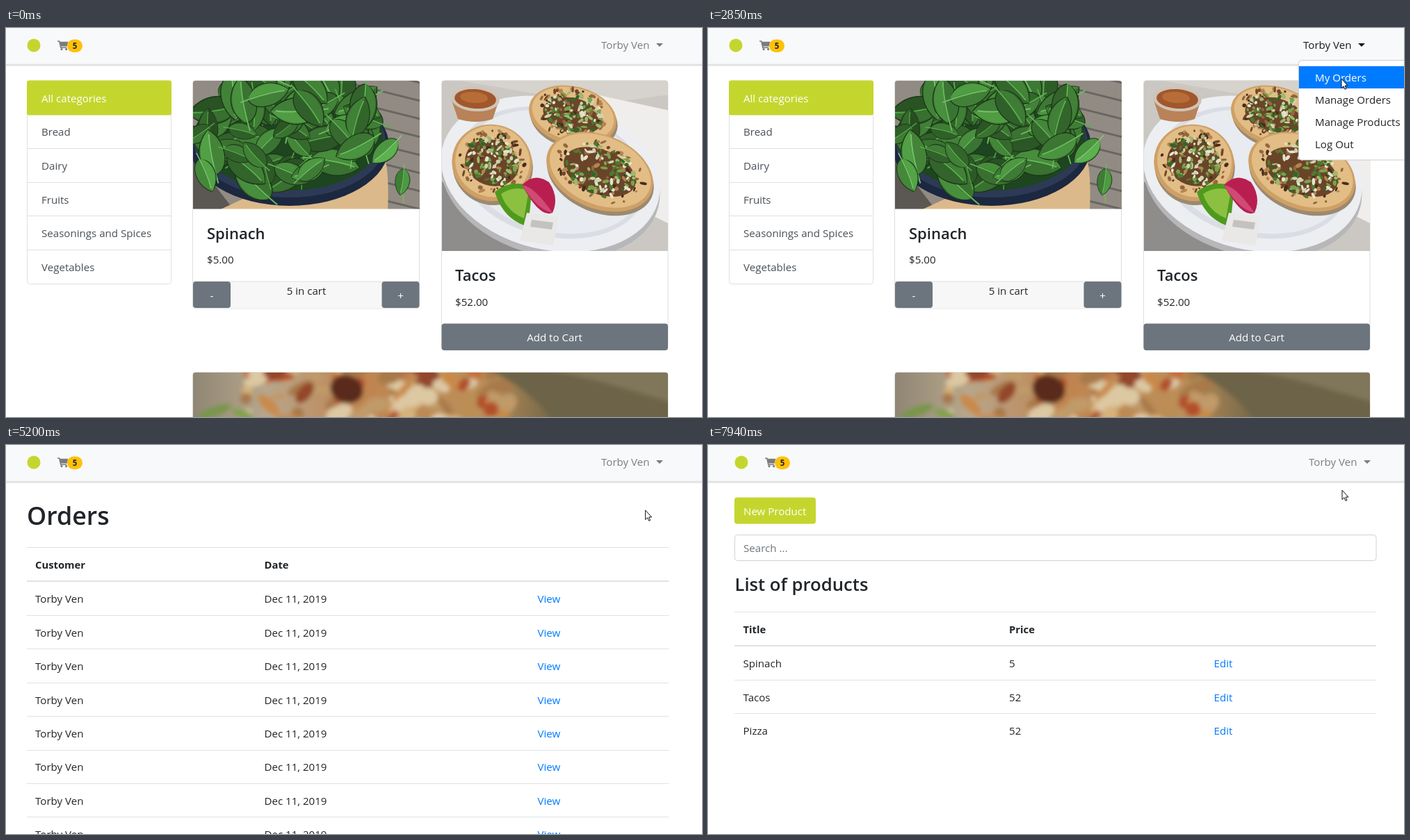
Write an HTML page that moves like this. It is 1001x560 px and loops after 8 s.

```html
<!DOCTYPE html>
<html lang="en">
<head>
<meta charset="utf-8">
<title>Shop</title>
<style>
html, body { margin: 0; width: 100%; height: 100%; overflow: hidden; background: #fff; }
svg { display: block; width: 100vw; height: 100vh; font: 15.1px "Open Sans", "Noto Sans", sans-serif; fill: #212529; }
.b { font-weight: 700; font-size: 14.8px; }
.h { font-weight: 600; }
</style>
</head>
<body>
<svg id="stage" viewBox="0 0 1001 560" preserveAspectRatio="none"></svg>
<script>
const LOOP = 8000;
const USER = 'Torby Ven';
const LIME = '#c4d62e', GREY = '#6c757d', BLUE = '#007bff';

// Markup helpers; text is placed by the middle of its capitals.
const text = (x, mid, s, attrs = '') => `<text x="${x}" y="${mid + 5.5}" ${attrs}>${s}</text>`;
const heading = (x, base, s, size) => `<text x="${x}" y="${base}" class="h" font-size="${size}">${s}</text>`;
const rect = (x, y, w, h, fill, attrs = '') => `<rect x="${x}" y="${y}" width="${w}" height="${h}" fill="${fill}" ${attrs}/>`;
const oval = (x, y, rx, ry, fill, turn = 0) =>
  `<ellipse cx="${x}" cy="${y}" rx="${rx}" ry="${ry}" fill="${fill}" transform="rotate(${turn} ${x} ${y})"/>`;
const path = (d, fill, attrs = '') => `<path d="${d}" fill="${fill}" ${attrs}/>`;
const rule = (x, y, w, h = 1) => rect(x, y, w, h, '#dee2e6');
const white = 'fill="#fff"', centred = 'text-anchor="middle"';
const repeat = (n, f) => Array.from({ length: n }, (_, i) => f(i)).join('');

let seed = 7;
const rnd = (a = 0, b = 1) => {
  seed = (seed * 16807) % 2147483647;
  return +(a + (b - a) * seed / 2147483647).toFixed(2);
};
const pick = list => list[Math.floor(rnd(0, list.length))];

function photo(id, x, y, w, h, body, blur = 0.7) {
  return `<clipPath id="${id}"><path d="M${x} ${y + h}V${y + 3}q0-3 3-3H${x + w - 3}q3 0 3 3V${y + h}Z"/></clipPath>
    <filter id="${id}Soft"><feGaussianBlur stdDeviation="${blur}"/></filter>
    <g clip-path="url(#${id})"><g filter="url(#${id}Soft)">${body}</g></g>`;
}

function leaf(x, y, size, turn, light) {
  const green = l => `hsl(112 40% ${l}%)`;
  return `<g transform="translate(${x} ${y}) rotate(${turn}) scale(${size})">
    <path d="M-1 .1C-.8-.7.4-.8 1 0C.4.75-.8.7-1 .1Z" fill="${green(light)}" stroke="${green(15)}" stroke-width=".04"/>
    <path d="M-1 0C-.7-.6.4-.7 1 0Q0-.15-1 0Z" fill="${green(light + 8)}"/>
    <path d="M-1.4.1Q0-.1.8 0" fill="none" stroke="${green(light + 22)}" stroke-width=".06"/></g>`;
}

function spinach() {
  const planks = repeat(9, i => path(`M400 ${30 + i * 26}L600 ${80 + i * 26}`, 'none', 'stroke="#696560" stroke-width="3"'));
  const leaves = repeat(85, i => {
    const a = rnd(0, 6.28), r = Math.sqrt(rnd());
    return leaf(402 + Math.cos(a) * r * 128, 144 + Math.sin(a) * r * 82, rnd(20, 36), rnd(0, 360), rnd(17, 30) + i / 9);
  });
  return rect(265, 70, 335, 195, '#918b84') + planks +
    path('M265 180L330 265H265Z', '#5b5752') +
    path('M300 265L440 200L540 180Q552 190 549 265Z', '#dcb98a') +
    oval(408, 170, 143, 86, '#1c2740') + oval(408, 164, 138, 80, '#2d3a55') + oval(408, 156, 134, 78, '#1d4520') +
    leaves + leaf(570, 222, 19, 100, 35) + path('M571 240L572 252', 'none', 'stroke="#7fae5e" stroke-width="2"') +
    leaf(545, 178, 24, 140, 42) + leaf(288, 212, 25, 70, 38);
}

function taco(x, y, rx, ry, turn) {
  const scatter = (n, spread, colours) => repeat(n, () => {
    const a = rnd(0, 6.28), r = Math.sqrt(rnd()) * spread;
    return oval(x + Math.cos(a) * r * rx, y - 3 + Math.sin(a) * r * ry, rnd(1.5, 5.5), rnd(1.2, 3), pick(colours), rnd(0, 180));
  });
  return `<g transform="rotate(${turn} ${x} ${y})">` +
    oval(x + 3, y + 5, rx, ry, '#9c8a70') + oval(x, y, rx, ry, '#cfa066') + oval(x, y - 2, rx - 4, ry - 4, '#e2bd85') +
    oval(x, y, rx * 0.68, ry * 0.6, '#6a4429') +
    scatter(80, 0.84, ['#4a2c1b', '#70452a', '#94663f', '#b58450']) +
    scatter(110, 0.68, ['#4d7a31', '#7ba24a', '#e6e2cd', '#cfd2ad', '#3c6127', '#9fb86c']) + '</g>';
}

function tacos() {
  return rect(620, 70, 340, 260, '#cbc8c4') +
    path('M620 70H960V95L850 110Z', '#d6d2cc') + path('M620 215L760 330H620Z', '#8f8d8c') +
    path('M845 95L960 120V285L900 255Z', '#efeeec') +
    oval(783, 219, 160, 109, '#b7b7b9', 14) + oval(783, 210, 160, 109, '#eceef1', 14) +
    oval(785, 208, 138, 92, '#dadde3', 14) + oval(787, 207, 131, 86, '#e8ebef', 14) +
    path('M641 104L650 131Q676 139 700 131L709 104Z', '#b98258') +
    oval(675, 102, 35, 18, '#d0c3b6', 4) + oval(675, 102, 30, 14, '#a0572c', 4) + oval(673, 100, 20, 8, '#b86c38', 4) +
    taco(815, 126, 64, 42, 14) + taco(699, 194, 58, 55, 20) + taco(854, 207, 80, 53, 22) +
    path('M703 236Q725 217 757 228L751 286Q715 276 703 236Z', '#4f9a1e') +
    path('M712 239Q730 226 752 234L745 274Q720 264 712 239Z', '#8cc040') +
    path('M742 226Q760 207 781 222Q796 244 786 266Q768 274 742 226Z', '#b81f50') +
    path('M742 226Q760 228 786 266Q764 262 742 226Z', '#d04a74') +
    path('M749 266L795 272L787 313L739 306Z', '#e9e8e6') + path('M756 276L787 280L785 290L754 286Z', '#c4c2bf');
}

function pizza() {
  const blobs = repeat(75, () =>
    oval(rnd(340, 730), rnd(490, 570), rnd(7, 24), rnd(5, 13),
      pick(['#b2502c', '#c98a4a', '#d6b27a', '#c09a68', '#94472a', '#dcc8a2', '#c4703a', '#a8794a']), rnd(-50, 50)));
  return `<linearGradient id="crust"><stop offset="0" stop-color="#8d8472"/><stop offset=".16" stop-color="#b7a78c"/>
    <stop offset=".35" stop-color="#c08450"/><stop offset=".6" stop-color="#bb8f58"/><stop offset=".74" stop-color="#7a6a4a"/>
    <stop offset="1" stop-color="#736a50"/></linearGradient>` +
    rect(262, 490, 700, 80, 'url(#crust)') + blobs +
    path('M690 490Q755 520 790 570H960V490Z', '#6d6449') + path('M770 490Q850 505 960 540V490Z', '#80765a') +
    oval(490, 520, 24, 20, '#5a2a1b', 20) + oval(300, 552, 26, 7, '#789648', -20) + oval(340, 556, 16, 7, '#84a050', 20);
}

const frame = (x, y, w, h) => rect(x, y, w, h, '#fff', 'rx="4" stroke="#dfdfdf"');
const button = (x, y, w, h, fill, attrs = '') => rect(x, y, w, h, fill, `rx="4" ${attrs}`);

const categories = ['All categories', 'Bread', 'Dairy', 'Fruits', 'Seasonings and Spices', 'Vegetables'];
const shopPage = frame(30.5, 76, 207, 292.5) + rect(30, 75.5, 208, 50, LIME, 'rx="3"') +
  repeat(6, i => (i > 1 ? rect(31, Math.round(76.3 + i * 48.5), 207, 1, '#dfdfdf') : '') +
    text(51, 101.3 + i * 48.6, categories[i], i ? 'fill="#495057"' : white)) +
  frame(268.5, 75.5, 326, 328.5) + photo('greens', 269, 76, 326, 184.5, spinach()) +
  heading(289, 304, 'Spinach', 22) + text(289, 333.5, '$5.00') +
  rect(269, 364.5, 325.5, 39, '#f7f7f7') + rect(269, 364.5, 325.5, 1, '#dfdfdf') +
  button(269, 365, 54, 38, GREY) + button(540.5, 365, 54, 38, GREY) +
  text(296, 385.5, '-', white + ' ' + centred) + text(567.5, 385.5, '+', white + ' ' + centred) +
  text(432, 378.3, '5 in cart', centred) +
  frame(626.5, 75.5, 325.5, 388) + photo('plate', 627, 76, 325, 245, tacos()) +
  heading(646, 364, 'Tacos', 22) + text(646, 394, '$52.00') +
  button(626.5, 425.5, 325.5, 38.5, GREY, 'id="add"') + text(789, 445.7, 'Add to Cart', white + ' ' + centred) +
  frame(268.5, 495.5, 683.5, 90) + photo('pie', 269, 496, 683, 80, pizza(), 3);

const link = `fill="${BLUE}"`;
const ordersPage = heading(30, 115, 'Orders', 35.8) +
  rule(30, 147, 923) + rule(30, 195, 923, 2) +
  text(42, 172.5, 'Customer', 'class="b"') + text(371.5, 172.5, 'Date', 'class="b"') +
  '<g id="orderRows">' + repeat(8, i => {
    const y = 221.7 + i * 48.45;
    return text(42, y, USER) + text(371.5, y, 'Dec 11, 2019') + text(764.5, y, 'View', link) + rule(30, Math.round(y + 23), 923);
  }) + '</g>';

const products = [['Spinach', 5], ['Tacos', 52], ['Pizza', 52]];
const listPage = button(38, 75.5, 117, 38, LIME) + text(51, 95.5, 'New Product', white) +
  rect(38.5, 129.5, 922.5, 37, '#fff', 'rx="4" stroke="#ced4da"') + text(51, 148.5, 'Search ...', `fill="${GREY}"`) +
  heading(38.5, 210, 'List of products', 25.7) +
  rule(38, 240, 923) + rule(38, 288, 923, 2) +
  text(50.5, 265.5, 'Title', 'class="b"') + text(433, 265.5, 'Price', 'class="b"') +
  '<g id="productRows">' + products.map(([name, price], i) => {
    const y = 314.5 + i * 48.5;
    return text(50.5, y, name) + text(433, y, price) + text(727.5, y, 'Edit', link) + (i < 2 ? rule(38, Math.round(y + 23), 923) : '');
  }).join('') + '</g>';

const nav = rect(0, 0, 1001, 52, '#f8f9fa') + rect(0, 51.7, 1001, 3, '#e2e3e4') +
  `<g id="navItems"><circle cx="40" cy="25" r="9.5" fill="${LIME}"/>
  <path d="M74 19h2.8l2 9.3h8.4" fill="none" stroke="#7c7c7d" stroke-width="1.6"/>
  <path d="M77.3 19.8H89.3L87.7 26.4H78.7Z" fill="#7c7c7d"/>
  <circle cx="80" cy="30.6" r="1.6" fill="#7c7c7d"/><circle cx="86.6" cy="30.6" r="1.6" fill="#7c7c7d"/>` +
  rect(88, 16.5, 22, 18.5, '#ffc107', 'rx="9.2"') +
  text(99, 24.7, '5', 'class="b" style="font-size:11.5px" ' + centred) +
  `<g id="user">${text(856, 24.8, USER)}<path d="M935 22h10l-5 5Z"/></g></g>`;

const menuItems = ['My Orders', 'Manage Orders', 'Manage Products', 'Log Out'];
const ITEM_TOP = 55, ITEM_H = 32;
const menu = '<g id="menu">' + rect(849.5, 46.5, 160, 143.5, '#fff', 'rx="4" stroke="#ccc"') +
  menuItems.map((s, i) => `<g class="item">${rect(850, ITEM_TOP + i * ITEM_H, 151, ITEM_H, '#fff')}${text(873, 71.7 + i * 31.9, s)}</g>`).join('') + '</g>';

const outline = 'stroke="#111" stroke-width="1" stroke-linejoin="round"';
const pointer = '<g id="pointer">' +
  path('M0 0V13.5L3 10.7L5 15.3L7 14.4L5 10H9Z', '#fff', outline + ' id="arrow"') +
  path('M-1.5 1.5Q-1.5 0 0 0T1.5 1.5V6Q4 5 4.7 6.8Q7 6 7.4 8Q9.5 7.5 9.5 9.5V13Q9.5 16 7.8 18.5H0Q-2 15-4.6 11.8Q-5.5 10-3.5 9.8L-1.5 11.5Z', '#fff', outline + ' id="hand"') +
  path('M-3-7H-.5L0-6.5L.5-7H3M0-6.5V6.5M-3 7H-.5L0 6.5L.5 7H3', 'none', 'stroke="#111" id="beam"') +
  '<circle id="click" r="12" fill="#ff0" opacity=".5"/></g>';

document.getElementById('stage').innerHTML = rect(0, 0, 1001, 560, '#fff') +
  `<g id="shop">${shopPage}</g><g id="orders">${ordersPage}</g><g id="list">${listPage}</g>` + nav + menu + pointer;

const $ = id => document.getElementById(id);
const show = (id, on) => { $(id).style.display = on ? '' : 'none'; };
const items = [...document.querySelectorAll('.item')];

// Pointer moves: first step, last step, number of steps, end point.
const START = [786, 500];
const moves = [
  [130, 910, 11, 882, 15],
  [1610, 1930, 5, 915, 101], [2010, 2250, 4, 911, 73],
  [3390, 3630, 4, 917, 32],
  [4100, 4500, 6, 920, 101],
  [5120, 5580, 7, 916, 25],
  [6310, 6680, 6, 926, 148],
  [7320, 7390, 2, 926, 147], [7620, 7620, 1, 926, 146], [7790, 7940, 3, 912, 65]
];
const clicks = [[1060, 1230], [2470, 2620], [3880, 3950], [4660, 4810], [5980, 6130], [7000, 7080]];
const menuOpen = [[1230, 2930], [3950, 4810], [6130, 7080]];
const presses = [[2470, 2930], [4660, 4810], [7000, 7080]];

const within = (t, [a, b]) => t >= a && t < b;
const ease = u => u < 0.5 ? 4 * u ** 3 : 1 - 4 * (1 - u) ** 3;

function pointerAt(t) {
  let [x, y] = START;
  for (const [from, to, steps, toX, toY] of moves) {
    if (t < from) break;
    const stepTime = (to - from) / (steps - 1 || 1) || 1;
    const u = ease(Math.min(steps, Math.floor((t - from) / stepTime + 1e-6) + 1) / steps);
    x += (toX - x) * u;
    y += (toY - y) * u;
  }
  return [x, y];
}

function draw(t) {
  const [x, y] = pointerAt(t);
  const page = t < 2930 ? 'shop' : t < 7080 ? 'orders' : 'list';
  for (const p of ['shop', 'orders', 'list']) show(p, p === page);
  show('orderRows', t >= 3010 && !within(t, [4810, 4890]));
  show('productRows', t >= 7160);
  $('navItems').setAttribute('transform', `translate(${page === 'list' ? 8 : 0} 0)`);

  const open = menuOpen.some(r => within(t, r));
  const onName = t >= 130 && x > 848 && x < 953 && y < 45;
  const onAdd = page === 'shop' && within(y, [426, 464]);
  const hovered = open ? Math.floor((y - ITEM_TOP) / ITEM_H) : -1;
  const pressed = presses.findIndex(r => within(t, r));

  show('menu', open);
  items.forEach((item, i) => {
    const [back, label] = item.children;
    back.setAttribute('fill', i === pressed ? BLUE : i === hovered ? '#f8f9fa' : '#fff');
    label.setAttribute('fill', i === pressed ? '#fff' : i === hovered ? '#16181b' : '#212529');
  });
  $('user').setAttribute('fill', `rgba(0,0,0,${open ? 0.9 : onName ? 0.7 : 0.5})`);
  $('add').setAttribute('fill', onAdd ? '#5a6268' : GREY);

  const beam = page === 'list' && within(y, [130, 167]);
  const hand = !within(t, [2770, 2930]) && (onName || onAdd || hovered >= 0);
  show('pointer', t >= 130);
  show('beam', beam);
  show('hand', hand);
  show('arrow', !beam && !hand);
  show('click', clicks.some(r => within(t, r)));
  $('pointer').setAttribute('transform', `translate(${x.toFixed(1)} ${y.toFixed(1)})`);
}

const began = performance.now();
function tick() {
  draw((performance.now() - began) % LOOP);
  requestAnimationFrame(tick);
}
tick();
</script>
</body>
</html>
```
